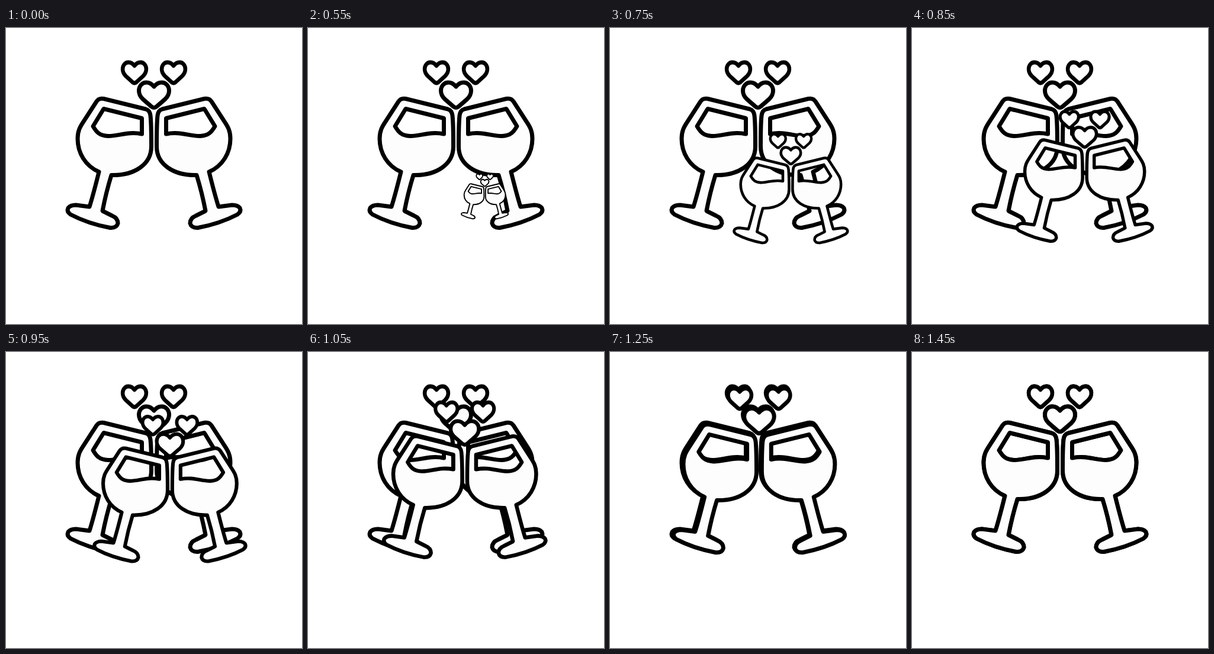
An HTML page for the animation above (1470 ms loop, 500 by 500 pixels).

```html
<!DOCTYPE html>
<html lang="en">
<head>
<meta charset="utf-8">
<title>Cheers</title>
<style>
  html, body { margin: 0; width: 100%; height: 100%; overflow: hidden; background: #fff; }
  svg { display: block; width: 100%; height: 100%; }
</style>
</head>
<body>
<svg viewBox="0 0 500 500">
  <defs>
    <!-- outline first, then the see-through opening above the wine -->
    <path id="glass" fill-rule="evenodd" d="
      M157 243 C134 233 121 211 121 187 C121 174 125 167 131 158
      L153 124 Q157 118 165 119.500 L236 137 Q243 139 244 148
      C245.500 162 245.500 180 245.500 200 C245.500 231 216 249.500 178 248.500
      C172 268 167 288 163 309 L179 317 Q189 321 189 330 Q187 338 176 337.500
      C152 333 128 325 109 315 Q102 310 105 304 Q109 299 118 299 L141 302
      C147 283 152 263 157 243 Z
      M165 136.500 L229.500 152.500 V179 C206 174 190 183 172 182.500
      C158 182 153 176 147 166 Z"/>
    <path id="heart" d="
      M0 99 C-4 94 -8 92 -13 92 C-20 92 -25.500 98 -25.500 106
      C-25.500 112 -23 116 -19 120 L-4 133 Q0 136 4 133 L19 120
      C23 116 25.500 112 25.500 106 C25.500 98 20 92 13 92 C8 92 4 94 0 99 Z"/>
    <g id="half">
      <use href="#glass"/>
      <use href="#heart" transform="translate(217 -17.400) scale(.78 .82)" stroke-width="8.400"/>
    </g>
    <g id="toast" fill="#fdfdfe" stroke="#000" stroke-width="7" stroke-linejoin="round">
      <use href="#half"/>
      <use href="#half" transform="matrix(-1 0 0 1 500 0)"/>
      <use href="#heart" x="250"/>
    </g>
  </defs>
  <use href="#toast"/>
  <use id="copy" href="#toast" visibility="hidden"/>
</svg>
<script>
  const LOOP = 1470, START = 550, STEP = 100, STEPS = 10;
  const copy = document.getElementById('copy');
  const t0 = performance.now();

  // Cubic ease-out for the scale; the position swings in on a matching arc.
  function draw(now) {
    const t = Math.max(0, now - t0) % LOOP;
    const n = Math.floor((t - START) / STEP) + 1;
    if (n < 1) {
      copy.setAttribute('visibility', 'hidden');
    } else {
      const rest = Math.max(0, 1 - n / STEPS) ** 3;
      const scale = 1 - rest;
      const shift = rest * (250 + 246 * scale);
      copy.setAttribute('transform', `translate(${shift} ${shift}) scale(${scale})`);
      copy.setAttribute('visibility', 'visible');
    }
    requestAnimationFrame(draw);
  }
  draw(t0);
</script>
</body>
</html>
```
